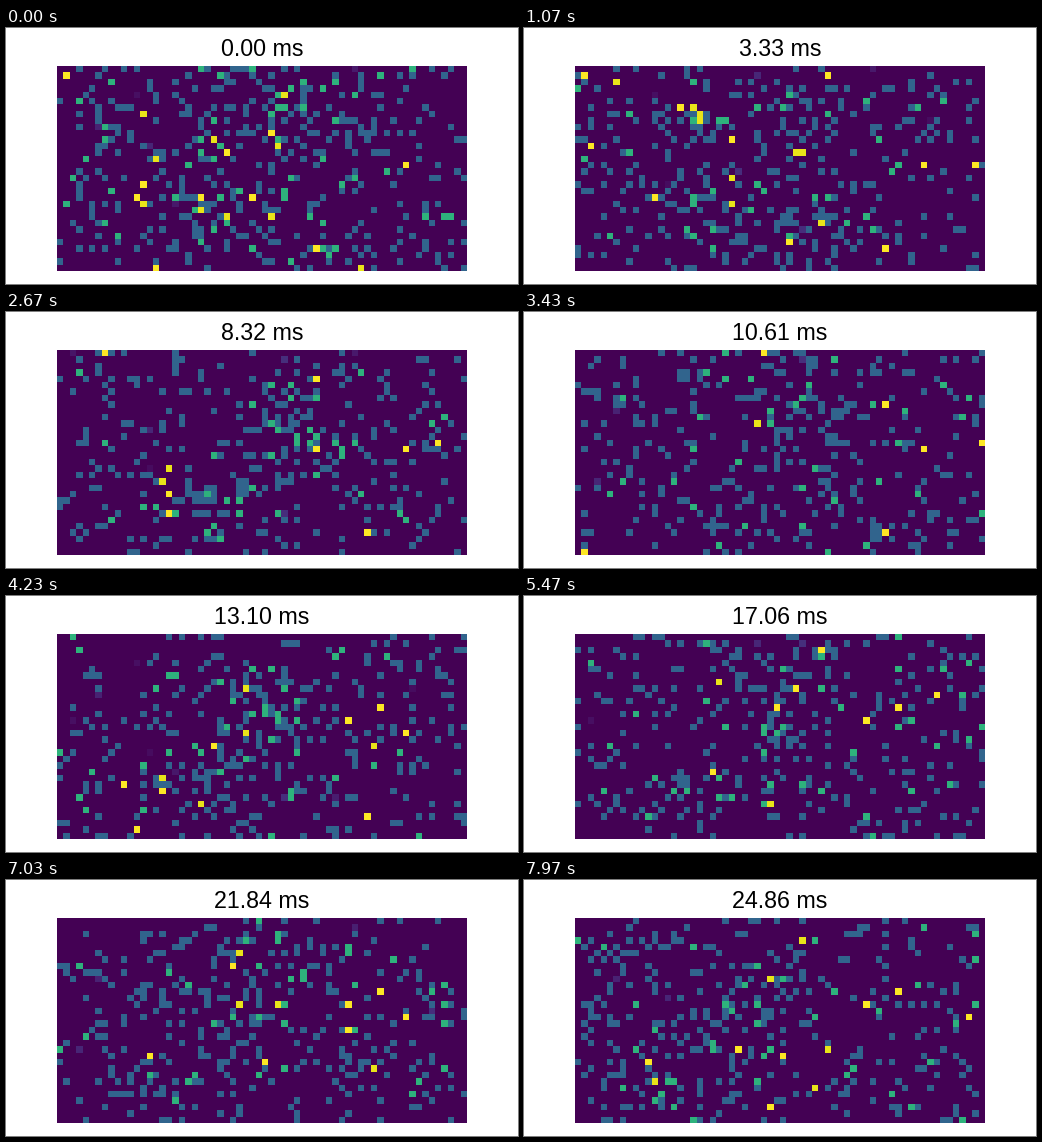
Write a matplotlib script that moves like this. It is 512 px wide and 256 px high and loops after 8 s.

```python
import matplotlib.pyplot as plt
import numpy as np
from matplotlib.animation import FuncAnimation

W, H, DPI = 512, 256, 100
COLS, ROWS = 64, 32
FRAMES, LOOP_MS = 240, 8000
STEP_MS = 0.104          # sensor time per frame
VMAX = 3.1               # counts at full scale
SPARKS = 4               # saturated cells per frame

# Hot cells: col, row, middle of the active span (fraction of the loop)
HOT = [(1, 1, 0.0), (12, 20, 0.0), (54, 15, 0.25),
       (48, 28, 0.35), (45, 13, 0.75), (50, 11, 0.8)]
HOT_SPAN = 0.3

plt.rcParams["font.family"] = "Liberation Sans"

x, y = np.meshgrid(np.arange(COLS), np.arange(ROWS))
setup = np.random.default_rng(5)
dim_cells = setup.choice(COLS * ROWS, 18, replace=False)
dim_values = setup.uniform(0.1, 0.45, dim_cells.size)


def bump(cx, cy, sx, sy):
    return np.exp(-((x - cx) / sx) ** 2 - ((y - cy) / sy) ** 2)


def patches(t):
    """Centres of the three drifting bright patches."""
    swing = 20 * np.exp(-4 * t) * np.sin(12 * t)
    return [(25 - 12 * t ** 2, 22 + 5 * t ** 2),
            (42 - 16 * t, 14 + 15 * np.exp(-(t / 0.2) ** 2)),
            (31 - swing, 7)]


def light(t):
    """Expected count in every cell."""
    rate = 0.115 + 0.08 * bump(28, 15, 22, 18)
    for cx, cy in patches(t):
        rate += 0.3 * bump(cx, cy, 6, 4)
    return rate * (0.85 + 0.45 * np.exp(-4 * t) + 0.1 * t ** 2)


def field(k):
    t = k / FRAMES
    rng = np.random.default_rng(1000 + k)
    rate = light(t)
    img = rng.poisson(rate * rng.gamma(2, 0.5, rate.shape)).astype(float)

    shown = rng.random(dim_cells.size) < 0.3
    img.flat[dim_cells[shown]] = dim_values[shown]

    weight = rate.ravel() / rate.sum()
    img.flat[rng.choice(rate.size, SPARKS, p=weight)] = VMAX
    for col, row, mid in HOT:
        if abs(t - mid) < HOT_SPAN:
            img[row, col] = VMAX
    return img


fig = plt.figure(figsize=(W / DPI, H / DPI), dpi=DPI, facecolor="white")
ax = fig.add_axes([0.1, 0.05, 0.8, 0.8])
ax.axis("off")
image = ax.imshow(field(0), cmap="viridis", vmin=0, vmax=VMAX,
                  interpolation="nearest", aspect="auto")
title = fig.text(0.5, 1 - 28 / H, "", fontsize=23.2 * 72 / DPI,
                 ha="center", va="baseline", color="black")


def update(k):
    image.set_data(field(k))
    title.set_text(f"{k * STEP_MS:.2f} ms")
    return image, title


anim = FuncAnimation(fig, update, frames=FRAMES, interval=LOOP_MS / FRAMES,
                     repeat=True, repeat_delay=0)
plt.show()
```
